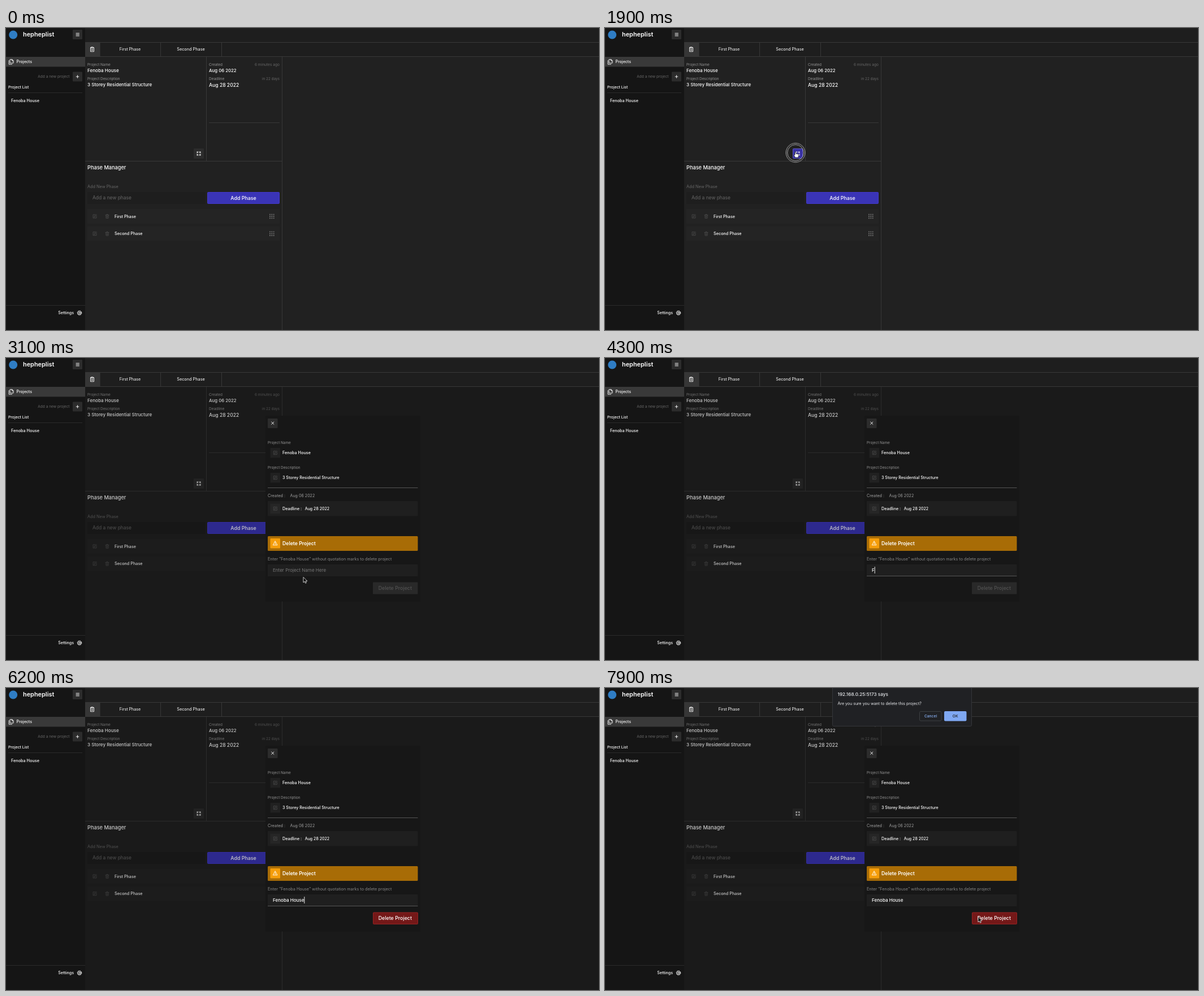
Animation, 1049 px wide and 534 px high, one loop 8 s. Source, as an HTML page:

```html
<!DOCTYPE html>
<html lang="en">
<head>
<meta charset="utf-8">
<title>Project manager</title>
<style>
html, body { margin: 0; width: 100%; height: 100%; overflow: hidden; background: #212121; }
svg { display: block; width: 1049px; height: 534px; }
text { font-family: Inter, "Open Sans", sans-serif; font-weight: 500; fill: #fff; white-space: pre; }
.label { font-weight: 400; font-size: 6.4px; fill: #949494; }
.dimmer { fill: #666; }
.thin { font-weight: 400; }
.bold { font-weight: 600; }
.mid { text-anchor: middle; }
.end { text-anchor: end; }
.rule { stroke: #383838; fill: none; }
.btn { fill: #2c2c2c; }
.icon { fill: none; stroke: #fff; stroke-width: .9; stroke-linecap: round; stroke-linejoin: round; }
.faint { stroke: #484848; }

#page { animation: blur 8s linear infinite; }
#veil, #modal { animation: open 8s linear infinite; }
#hover { animation: hover 8s linear infinite; }
#dialog { animation: dialog 8s linear infinite; }
#cursor { animation: move 8s ease-in-out infinite; }

@keyframes blur { 0%, 25% { filter: blur(0); } 27.5%, 100% { filter: blur(.6px); } }
@keyframes open { 0%, 25% { opacity: 0; } 27.5%, 100% { opacity: 1; } }
@keyframes hover { 0%, 21% { opacity: 0; } 22.5%, 25.5% { opacity: 1; } 27.5%, 100% { opacity: 0; } }
@keyframes dialog {
  0%, 95.5% { opacity: 0; transform: translateY(-8px); }
  97.5%, 100% { opacity: 1; transform: none; }
}
@keyframes move {
  0%, 3.75% { transform: translate(305px, 302px); }
  11.25%, 17% { transform: translate(66px, 199px); }
  22.5%, 28% { transform: translate(337px, 220.5px); }
  38.75%, 39.5% { transform: translate(526px, 388px); }
  46%, 82% { transform: translate(540px, 375px); }
  90.5%, 100% { transform: translate(660px, 405px); }
}
</style>
</head>
<body>
<svg viewBox="0 0 1049 534">
  <defs>
    <g id="edit" class="icon faint">
      <path d="M.5-3H-3V3H3V-.3"/><path d="M-1.2 1.2 -.8-.5 2.4-3.5 3.5-2.4.4.7Z"/>
    </g>
    <g id="trash" class="icon faint">
      <path d="M-3-2.2H3M-1-2.2V-3.4H1V-2.2M-2.3-2.2-2 3.4H2L2.3-2.2M-.8-.5V1.8M.8-.5V1.8"/>
    </g>
    <g id="grip" fill="none" stroke="#6a6a6a" stroke-width="1.9" stroke-dasharray="1.9 1.45">
      <path d="M-4.3-3.3H4.3M-4.3 0H4.3M-4.3 3.3H4.3"/>
    </g>
    <path id="expand" class="icon" d="M-3-1V-3H-1M1-3H3V-1M3 1V3H1M-1 3H-3V1M-3-3-1.3-1.3M3-3 1.3-1.3M3 3 1.3 1.3M-3 3-1.3 1.3"/>
  </defs>

  <rect width="1049" height="534" fill="#212121"/>

  <g id="page">
    <path class="rule" d="M354.5 51V235M140 235.5H488M359 167.5H484M488.5 51V534"/>
    <text class="label" x="144" y="66.5">Project Name</text>
    <text x="144" y="77.8" font-size="8.1">Fenoba House</text>
    <text class="label" x="144" y="91.8">Project Description</text>
    <text x="144" y="102.9" font-size="8.05">3 Storey Residential Structure</text>
    <text class="label" x="359" y="66.5">Created</text>
    <text class="label dimmer end" x="484" y="66.5" style="font-size:6.6px">6 minutes ago</text>
    <text x="359" y="77.8" font-size="7.8">Aug 06 2022</text>
    <text class="label" x="359" y="91.8" style="font-size:6.6px">Deadline</text>
    <text class="label dimmer end" x="484" y="91.8">in 22 days</text>
    <text x="359" y="103.8" font-size="8.6">Aug 28 2022</text>
    <rect class="btn" x="332" y="213" width="18" height="18" rx="1"/>
    <g id="hover"><rect x="332.5" y="213.5" width="17" height="17" rx="1" fill="#3730a3" stroke="#5f59c4"/></g>
    <use href="#expand" x="341" y="222"/>
    <text x="144" y="250" font-size="9.2">Phase Manager</text>
    <text class="thin dimmer" x="144" y="283.2" font-size="7.3">Add New Phase</text>
    <rect x="144" y="290" width="209" height="21" fill="#1e1e1e"/>
    <text class="thin dimmer" x="153" y="303.1" font-size="8.45">Add a new phase</text>
    <rect x="356.5" y="290.5" width="127" height="20" rx="1" fill="#3a34b6" stroke="#4338ca"/>
    <text class="mid" x="420" y="303.5" font-size="8.9">Add Phase</text>
    <rect x="144" y="320" width="340" height="26" fill="#242424"/>
    <rect x="144" y="350.5" width="340" height="26" fill="#242424"/>
    <use href="#edit" x="157" y="333"/><use href="#trash" x="179" y="333"/><use href="#grip" x="470.3" y="333"/>
    <use href="#edit" x="157" y="363.7"/><use href="#trash" x="179" y="363.7"/><use href="#grip" x="470.3" y="363.7"/>
    <text x="192" y="335.7" font-size="7.15">First Phase</text>
    <text x="192" y="366.4" font-size="7.25">Second Phase</text>
  </g>
  <rect id="veil" x="140" y="51" width="909" height="483" fill="#000" fill-opacity=".22"/>

  <g id="topbar">
    <rect x="140" width="909" height="51" fill="#1e1e1e"/>
    <rect x="140" y="25" width="26" height="26" fill="#363636"/>
    <path class="rule" d="M140 25.5H1049M140 50.5H1049M166 25V51M273.5 25V51M381.5 25V51"/>
    <path class="icon" d="M151-3.2H149.5V4H155.5V-3.2H154M151-4H154V-2.3H151ZM151.2 0H153.8M151.2 1.8H153.8" transform="translate(0 37.7)"/>
    <text class="thin mid" x="219.5" y="40.2" font-size="7.15">First Phase</text>
    <text class="thin mid" x="327" y="40.2" font-size="7.3">Second Phase</text>
  </g>

  <g id="sidebar">
    <rect width="140" height="534" fill="#151515"/>
    <circle cx="12.7" cy="12" r="7.5" fill="#2f7dc4"/>
    <text class="bold" x="30" y="15" font-size="10.9">hepheplist</text>
    <rect class="btn" x="118" y="3" width="17" height="17" rx="1"/>
    <path class="icon" d="M124 9.3H129.4M124 11.6H129.4M124 13.9H129.4"/>
    <rect y="51" width="140" height="17.5" fill="#393939"/>
    <path class="icon" d="M7.5 55.5H10.8L13 57.7V62H7.5ZM10.6 55.5V58H13M5.2 57.5V64.2H10.6"/>
    <text x="18.5" y="62.1" font-size="7.05">Projects</text>
    <text class="thin dimmer end" x="112.5" y="88.4" font-size="6.55">Add a new project</text>
    <rect class="btn" x="118" y="77.5" width="17" height="17" rx="1"/>
    <path class="icon" d="M124.2 86H128.8M126.5 83.7V88.3"/>
    <text x="4" y="107.1" font-size="6.8">Project List</text>
    <path class="rule" d="M4 114.5H135M0 490.5H140" style="stroke:#2a2a2a"/>
    <text x="9" y="130.7" font-size="7.25">Fenoba House</text>
    <text class="end" x="120" y="506.2" font-size="7.1">Settings</text>
    <g class="icon" transform="translate(130 503.8)">
      <circle r="3.2"/><circle r="1.3"/><circle r="3.9" stroke-dasharray="1.4 1.66" stroke-linecap="butt"/>
    </g>
  </g>

  <g id="modal">
    <rect x="459" y="102" width="274" height="328.5" rx="2" fill="#171717"/>
    <rect class="btn" x="463" y="107" width="17.5" height="17" rx="1"/>
    <path class="icon" d="M469.6 113 473.9 117.3M473.9 113 469.6 117.3"/>
    <text class="label" x="463" y="152.1">Project Name</text>
    <text class="label" x="463" y="196.1">Project Description</text>
    <rect x="463" y="253" width="265.5" height="26.5" rx="1" fill="#1f1f1f"/>
    <g fill="#212121">
      <rect x="467.5" y="159" width="17.5" height="17.5"/>
      <rect x="467.5" y="203" width="17.5" height="17.5"/>
      <rect x="467.5" y="257.5" width="17.5" height="17.5" fill="#262626"/>
    </g>
    <use href="#edit" x="476.3" y="167.7"/><use href="#edit" x="476.3" y="211.7"/><use href="#edit" x="476.3" y="266.3"/>
    <text x="489" y="170.3" font-size="7.25">Fenoba House</text>
    <text x="489" y="214.2" font-size="7.1">3 Storey Residential Structure</text>
    <path d="M463 229.5H728.5" stroke="#555"/>
    <text class="thin" x="463" y="246.3" font-size="7.2" style="fill:#a0a0a0">Created :</text>
    <text class="thin" x="502.5" y="246.3" font-size="7.1" style="fill:#a0a0a0">Aug 06 2022</text>
    <text x="489" y="268.8" font-size="7.2">Deadline :</text>
    <text x="528.7" y="268.8" font-size="7">Aug 28 2022</text>
    <rect x="463" y="315" width="265.5" height="26" rx="1.5" fill="#a86c06"/>
    <rect x="467.5" y="319" width="17.5" height="17.5" rx="1" fill="#f59e0b"/>
    <path class="icon" d="M476.3 324 480 330.8H472.6ZM476.3 326.5V328.3M476.3 329.6V329.7"/>
    <text class="bold" x="489" y="330.8" font-size="8.7">Delete Project</text>
    <text class="thin" x="463" y="357.6" font-size="7.27" style="fill:#858585">Enter "Fenoba House" without quotation marks to delete project</text>
    <rect x="463" y="365" width="265.5" height="21" fill="#1f1f1f"/>
    <path data-show="3900-7700" d="M463 385.5H728.5" stroke="#555"/>
    <text data-show="0-4300" class="thin" x="472" y="378" font-size="8.07" style="fill:#777">Enter Project Name Here</text>
    <text id="typed" x="472" y="378" font-size="8.05"></text>
    <rect id="caret" data-show="4000-7700" x="472" y="369" width=".9" height="12" fill="#fff"/>
    <g data-show="0-6200">
      <rect x="649" y="396.5" width="79.5" height="21" rx="1" fill="#292929"/>
      <text class="mid" x="688.3" y="409.8" font-size="8.85" style="fill:#515151">Delete Project</text>
    </g>
    <g data-show="6200-8000">
      <rect x="649.5" y="397" width="79" height="20.5" rx="1" fill="#741818" stroke="#962323"/>
      <text class="mid" x="688.3" y="409.8" font-size="8.85">Delete Project</text>
    </g>
  </g>

  <g id="dialog">
    <path d="M402.5-10H648.5V65.5Q648.5 67.5 646.5 67.5H404.5Q402.5 67.5 402.5 65.5Z" fill="#202124" stroke="#35363a"/>
    <text x="411.5" y="14" font-size="8.2" style="fill:#e8eaed">192.168.0.25:5173 says</text>
    <text class="thin" x="411.5" y="29.7" font-size="7.05" style="fill:#e8eaed">Are you sure you want to delete this project?</text>
    <rect x="556.5" y="41.5" width="38.5" height="16.5" rx="2" fill="none" stroke="#3c4043"/>
    <text class="mid" x="576" y="52.2" font-size="6.7" style="fill:#8ab4f8">Cancel</text>
    <rect x="600" y="41" width="39.5" height="17.5" rx="2" fill="#7fa8f2"/>
    <text class="mid" x="619.7" y="52.2" font-size="6.7" style="fill:#202124">OK</text>
  </g>

  <g id="cursor">
    <g data-show="1800-2000,3750-4000,7400-7600" fill="none">
      <circle r="15.7" stroke="#111" stroke-width="2"/>
      <g stroke="#ddd" stroke-width=".8"><circle r="16.8"/><circle r="14.4"/></g>
    </g>
    <path data-show="300-1750,2300-3350,6800-7000,7700-8000" d="M0-.5V9L2.2 7 3.7 10.2 5.3 9.5 3.9 6.4H6.8Z" fill="#000" stroke="#fff" stroke-width=".8"/>
    <path data-show="3350-4100,6600-6800" d="M-2-5.5Q0-5.5 0-4V4Q0 5.5-2 5.5M2-5.5Q0-5.5 0-4M0 4Q0 5.5 2 5.5" fill="none" stroke="#ddd" stroke-width=".9"/>
    <path data-show="1750-2300,7000-7700" d="M-1-1Q0-2.2 1-1V2Q2 1.2 2.8 2.2 3.8 1.6 4.3 2.6 5.6 2.2 5.7 3.6V5.5L4.6 8.6H-.2L-2.8 5Q-3.2 3.4-1.6 3.6L-1 4.2Z" fill="#fff" stroke="#000" stroke-width=".7"/>
  </g>
</svg>
<script>
const LOOP = 8000;
const NAME = "Fenoba House";
const KEY_TIMES = [4300, 4500, 4700, 4800, 5000, 5100, 5200, 5400, 5600, 5800, 5900, 6200];
const typed = document.getElementById("typed");
const caret = document.getElementById("caret");
const timed = [...document.querySelectorAll("[data-show]")].map(el => ({
  el,
  spans: el.dataset.show.split(",").map(s => s.split("-").map(Number))
}));
let start;

function draw(now) {
  start ??= now;
  const t = (now - start) % LOOP;
  for (const { el, spans } of timed) {
    const on = spans.some(([from, to]) => t >= from && t < to);
    el.style.visibility = on ? "visible" : "hidden";
  }
  const text = NAME.slice(0, KEY_TIMES.filter(k => k <= t).length);
  if (typed.textContent !== text) typed.textContent = text;
  caret.setAttribute("x", 472 + (text ? typed.getComputedTextLength() : 0));
  requestAnimationFrame(draw);
}
requestAnimationFrame(draw);
</script>
</body>
</html>
```
